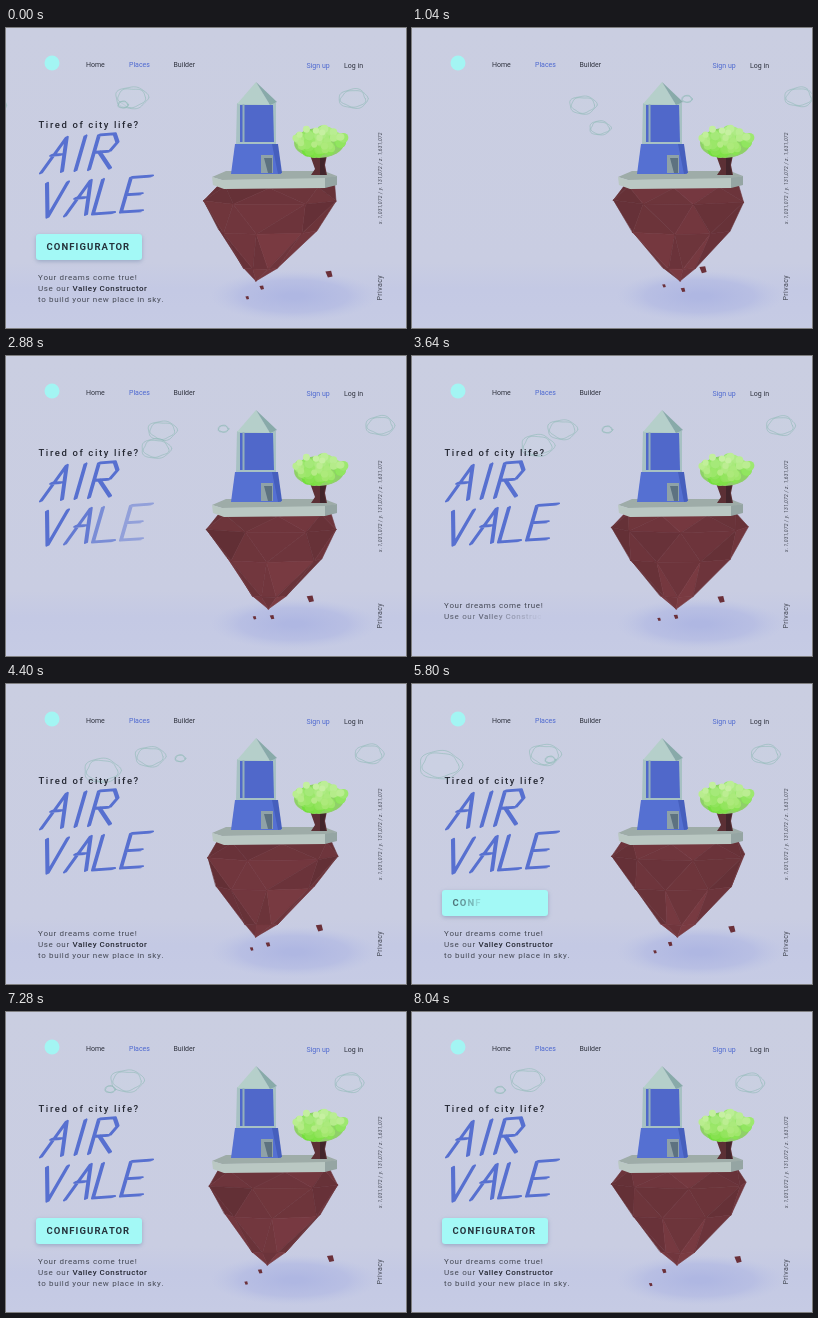
An HTML page with a canvas that plays this animation: 400 by 300 pixels, repeating every 8080 ms.

```html
<!DOCTYPE html>
<html lang="en">
<head>
<meta charset="utf-8">
<title>Floating island</title>
<style>
html, body { margin: 0; width: 100%; height: 100%; overflow: hidden; background: #c9cde1; }
canvas { display: block; width: 400px; height: 300px; }
</style>
</head>
<body>
<canvas id="stage"></canvas>
<script>
const LOOP = 8080, POSTER = 6700, TAU = Math.PI * 2;
const INK = '#30333f', BLUE = '#4e69d0', BODY = '#454955', STRONG = '#252833';
const canvas = document.getElementById('stage');
const ctx = canvas.getContext('2d');
const dpr = window.devicePixelRatio || 1;
canvas.width = 400 * dpr;
canvas.height = 300 * dpr;

const ramp = (t, start, length) => Math.max(0, Math.min(1, (t - start) / length));
const rnd = seed => {
  const v = Math.sin(seed * 12.9898 + 4.1) * 43758.5453;
  return v - Math.floor(v);
};

function poly(color, ...p) {
  ctx.fillStyle = color;
  ctx.beginPath();
  for (let i = 0; i < p.length; i += 2) ctx.lineTo(p[i], p[i + 1]);
  ctx.closePath();
  ctx.fill();
}

function ball(color, x, y, rx, ry = rx) {
  ctx.fillStyle = color;
  ctx.beginPath();
  ctx.ellipse(x, y, rx, ry, 0, 0, TAU);
  ctx.fill();
}

function setType(font, color, spacing = 0) {
  ctx.font = font + ' Roboto, sans-serif';
  ctx.letterSpacing = spacing + 'px';
  ctx.fillStyle = color;
}

function label(str, x, y, font, color, spacing) {
  setType(font, color, spacing);
  ctx.fillText(str, x, y);
}

// Letters fade in one after another; returns the x after the last one
function typed(t, str, x, y, font, color, spacing, start, step) {
  setType(font, color, spacing);
  [...str].forEach((ch, i) => {
    ctx.globalAlpha = ramp(t, start + i * step, 300);
    ctx.fillText(ch, x + ctx.measureText(str.slice(0, i)).width, y);
  });
  ctx.globalAlpha = 1;
  return x + ctx.measureText(str).width;
}

function background() {
  const g = ctx.createLinearGradient(0, 0, 0, 300);
  g.addColorStop(0, '#cacee1');
  g.addColorStop(.78, '#c9cde2');
  g.addColorStop(.87, '#c4c9e4');
  g.addColorStop(1, '#c6cbe4');
  ctx.fillStyle = g;
  ctx.fillRect(0, 0, 400, 300);

  ctx.save();
  ctx.translate(288, 268);
  ctx.scale(1, .3);
  const s = ctx.createRadialGradient(0, 0, 10, 0, 0, 84);
  s.addColorStop(0, '#afb7e2');
  s.addColorStop(.6, '#b5bce3cc');
  s.addColorStop(1, '#bdc4e400');
  ball(s, 0, 0, 84);
  ctx.restore();
}

// Drift to the left with speed v and acceleration a; width grows, height rises
const clouds = [
  { x: 171, y: 77, w: 28, v: 8, a: 0, grow: 1, rise: 1.3 },
  { x: 188, y: 100, w: 22, v: 12.6, a: 4.4, grow: 4.6, rise: 4 },
  { x: 275, y: 71, w: 11, v: 33, a: -.9, grow: 0, rise: -1 },
  { x: 387, y: 69, w: 30, v: 7, a: 0, grow: 0, rise: -.3 }
];

function cloud(c, t) {
  const s = (t - 1040) / 1000;
  const x = c.x - c.v * s - c.a * s * s, y = c.y - c.rise * s;
  const w = c.w + c.grow * s, h = w * .67;
  for (const ring of [.48, .41]) {
    ctx.beginPath();
    for (let a = 0; a < TAU; a += .1) {
      const r = ring + .022 * Math.sin(a * 5 + ring * 30) + .015 * Math.cos(a * 3 + c.x);
      ctx.lineTo(x + w * r * Math.cos(a), y + h * r * Math.sin(a));
    }
    ctx.closePath();
    ctx.fillStyle = '#cbd3e240';
    ctx.fill();
    ctx.strokeStyle = '#7db3a980';
    ctx.lineWidth = .9;
    ctx.stroke();
  }
}

// Low-poly rock: rings of height and radius turning round a leaning axis
const rings = [[156, 58], [172, 67], [203, 50], [240, 17], [253, 0]];
const SIDES = 7, TURN = 2220;

function rockPoint(k, i, turn) {
  const [y, r] = rings[k];
  const id = k * SIDES + i % SIDES;
  const a = (i + k / 2 + .3 * rnd(id)) / SIDES * TAU - turn;
  const radius = r * (.96 + .1 * rnd(id + 50));
  const axis = 269 - k * 2.5 - k * 2.3 * Math.cos(turn);
  return [axis + radius * Math.sin(a), y + radius * Math.cos(a) * .07];
}

function facet(a, b, c, seed) {
  const facing = (b[0] - a[0]) * (c[1] - a[1]) - (b[1] - a[1]) * (c[0] - a[0]);
  if (facing <= 0) return;
  const mid = (a[0] + b[0] + c[0]) / 3;
  const color = `hsl(353 35% ${31 + 4.5 * rnd(seed) - Math.abs(mid - 272) / 20}%)`;
  poly(color, ...a, ...b, ...c);
  ctx.strokeStyle = color;
  ctx.lineWidth = .6;
  ctx.stroke();
}

function rock(t) {
  const turn = (t - 6630) / TURN * TAU;
  for (let k = 0; k < rings.length - 1; k++) {
    for (let i = 0; i < SIDES; i++) {
      const a = rockPoint(k, i, turn), b = rockPoint(k, i + 1, turn);
      const c = rockPoint(k + 1, i, turn), d = rockPoint(k + 1, i + 1, turn);
      facet(a, b, c, k * 20 + i);
      facet(b, d, c, k * 20 + i + 9);
    }
  }
}

function pebble(x, y, s) {
  poly('#6b3039', x - s, y - s * .8, x + s * .6, y - s, x + s, y + s * .6, x - s * .3, y + s * .9);
}

function pebbles(t) {
  const s = (t - 1040) / 1000;
  const orbit = .49 + s * .13;
  pebble(252 - 1.9 * s, 258 + 2.1 * s, 1.8);
  pebble(271 - 2.7 * s, 262 - .4 * s, 2.3);
  pebble(259 + 68 * Math.sin(orbit), 249 - 8 * Math.cos(orbit), 3.6);
}

function house() {
  poly('#9eaca8', 206, 149, 220, 143, 318, 143, 331, 148, 319, 151, 216, 152);
  poly('#bac8c3', 206, 149, 216, 152, 319, 150, 319, 160, 218, 161, 207, 157);
  poly('#95a5a3', 319, 150, 331, 148, 331, 157, 319, 160);

  poly('#5570d2', 229, 116, 267, 116, 275, 146, 225, 146);
  poly('#465fbd', 266, 116, 272, 116, 276, 145, 272, 146);
  poly('#8fa2a7', 255, 127, 267, 127, 267, 145, 255, 145);
  poly('#5d7280', 258, 130, 266, 130, 266, 145, 262, 145);

  poly('#a7c1c3', 231, 75, 270, 75, 270, 116, 230, 116);
  poly('#5068ca', 234, 77, 267, 77, 268, 114, 234, 114);
  poly('#94b0bb', 236.5, 76, 238.5, 76, 238.5, 114, 236.5, 114);
  poly('#b5cfca', 250, 54, 231, 76, 264, 77);
  poly('#88aaa9', 250, 54, 264, 77, 271, 74);
}

function tree() {
  poly('#5c3035', 304, 127, 309, 130, 313, 126, 321, 127, 319, 137, 321, 147, 305, 147, 309, 141);
  poly('#42252b', 314, 129, 320, 128, 318, 137, 320, 147, 314, 147);
  ball('#8fd068', 313, 115, 25, 15);
  const count = 70;
  for (let i = 0; i < count; i++) {
    const a = rnd(i) * TAU, d = Math.sqrt(rnd(i + 100));
    const lift = 1 - i / count;
    const x = 313.5 + Math.cos(a) * d * 25;
    const y = 110 + Math.sin(a) * d * 12 + lift * 5;
    ball(`hsl(${92 + lift * 8} 72% ${76 - lift * 14 - (y - 110) * .5}%)`, x, y, 3 + lift * 3);
  }
}

// Brush strokes on a 4 by 4 grid, written as pairs of digits
const glyphs = {
  A: ['043044', '1232'], I: ['2024'], R: ['0004', '0030413202', '1244'],
  V: ['002440'], L: ['000444'], E: ['400004', '0232', '0444']
};

function brushWord(t, word, left, base, step, first) {
  const width = 21, height = 34;
  ctx.strokeStyle = '#5770d0';
  ctx.lineWidth = 1.9;
  ctx.lineJoin = ctx.lineCap = 'round';
  [...word].forEach((ch, n) => {
    ctx.globalAlpha = ramp(t, 1700 + (first + n) * 140, 700);
    ctx.beginPath();
    for (const stroke of glyphs[ch]) {
      for (const shift of [-1.1, 0, 1.1]) {
        for (let i = 0; i < stroke.length; i += 2) {
          const up = 1 - stroke[i + 1] / 4;
          const x = left + n * step + stroke[i] / 4 * width + up * 10;
          const y = base - up * height - (x - left) * .07;
          ctx[i ? 'lineTo' : 'moveTo'](x + shift, y - shift * .5);
        }
      }
    }
    ctx.stroke();
  });
  ctx.globalAlpha = 1;
}

function button(t) {
  ctx.save();
  ctx.globalAlpha = ramp(t, 4700, 700);
  ctx.shadowColor = '#6f86a888';
  ctx.shadowBlur = 4 * dpr;
  ctx.shadowOffsetY = 1.5 * dpr;
  ctx.fillStyle = '#a3f9f6';
  ctx.beginPath();
  ctx.roundRect(30, 206, 106, 26, 3);
  ctx.fill();
  ctx.restore();
  typed(t, 'CONFIGURATOR', 40.5, 222, '700 9.5px', '#25323b', 1.1, 5600, 50);
}

function copy(t) {
  typed(t, 'Tired of city life?', 32.5, 100, '500 9.5px', STRONG, 1.6, 1200, 35);
  brushWord(t, 'AIR', 35, 145, 24, 0);
  brushWord(t, 'VALE', 31, 190, 28, 3);
  typed(t, 'Your dreams come true!', 32, 251.5, '400 8px', BODY, .65, 3100, 12);
  const x = typed(t, 'Use our ', 32, 262.5, '400 8px', BODY, .65, 3360, 12);
  typed(t, 'Valley Constructor', x, 262.5, '500 8px', STRONG, .5, 3460, 12);
  typed(t, 'to build your new place in sky.', 32, 273.5, '400 8px', BODY, .65, 3690, 12);
  button(t);
}

function sideText(str, x, y, font, spacing) {
  ctx.save();
  ctx.translate(x, y);
  ctx.rotate(-Math.PI / 2);
  label(str, 0, 0, font, BODY, spacing);
  ctx.restore();
}

function menu() {
  ball('#a3f5f3', 46, 35, 7.5);
  label('Home', 80, 39, '400 7px', INK);
  label('Places', 123, 39, '400 7px', BLUE);
  label('Builder', 167.5, 39, '400 7px', INK);
  label('Sign up', 300.5, 39.5, '400 7px', BLUE);
  label('Log in', 338, 39.5, '400 7px', INK);
  sideText('x. 1,031,072 / y. 131,072 / z. 1,631,072', 375.8, 196, 'italic 400 5px', .23);
  sideText('Privacy', 376, 272.5, '400 7px', .4);
}

function frame() {
  let t = performance.now() % LOOP;
  if (t < 40) t = POSTER; // the loop opens on a finished view
  ctx.setTransform(dpr, 0, 0, dpr, 0, 0);
  background();
  clouds.forEach(c => cloud(c, t));
  rock(t);
  pebbles(t);
  house();
  tree();
  copy(t);
  menu();
  requestAnimationFrame(frame);
}
frame();
</script>
</body>
</html>
```
